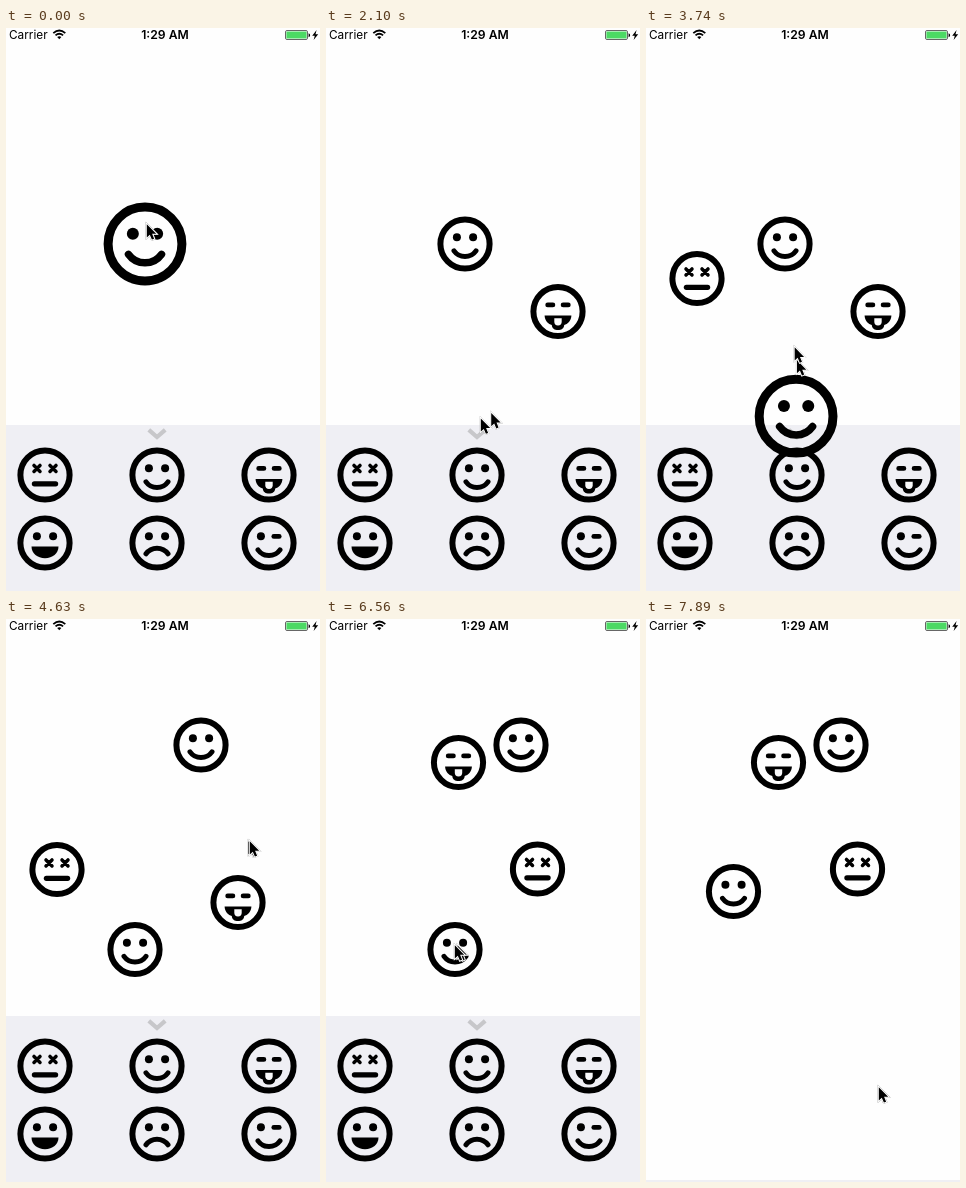
Write an HTML page that moves like this. It is 314 by 563 pixels and loops after 8 s.

```html
<!DOCTYPE html>
<html lang="en">
<head>
<meta charset="utf-8">
<title>Emoji tray</title>
<style>
  html, body { margin: 0; height: 100%; overflow: hidden; background: #fefefe; }
  svg { display: block; width: 100vw; height: 100vh; }
  text { font: 11.8px Inter, "Liberation Sans", sans-serif; }
  .line { fill: none; stroke: #000; stroke-linecap: round; stroke-linejoin: round; }
  #pointer { filter: drop-shadow(0 .6px .7px rgba(0, 0, 0, .5)); }
</style>
</head>
<body>
<svg viewBox="0 0 314 563">
  <defs>
    <circle id="ring" r="24.6" class="line" stroke-width="6"/>
    <g id="eyes"><circle cx="-8.1" cy="-6.8" r="4"/><circle cx="8.1" cy="-6.8" r="4"/></g>
    <path id="grin" class="line" stroke-width="5" d="M-11 6.9A13.5 13.5 0 0 0 11 6.9"/>

    <g id="smile"><use href="#ring"/><use href="#eyes"/><use href="#grin"/></g>
    <g id="dead">
      <use href="#ring"/>
      <path class="line" stroke-width="3.5" d="M-11-9.6l6 6m0-6l-6 6M5-9.6l6 6m0-6l-6 6"/>
      <path class="line" stroke-width="5.2" d="M-10.6 8.8H10.6"/>
    </g>
    <g id="tongue">
      <use href="#ring"/>
      <path class="line" stroke-width="4.8" d="M-10.3-6.6h5.2M5.1-6.6h5.2"/>
      <path d="M-13.4 4H13.4C13.4 9 9.5 13 6.2 13.4C6 16.8 3.4 18.6 0 18.6S-6 16.8-6.2 13.4C-9.5 13-13.4 9-13.4 4Z"/>
      <path fill="#fafafb" d="M-3.7 6.8H3.7V10.2A3.7 3.7 0 0 1-3.7 10.2Z"/>
    </g>
    <g id="laugh">
      <use href="#ring"/><use href="#eyes"/>
      <path d="M-13.5 3.5H13.5C13.5 10.5 7.5 15.2 0 15.2S-13.5 10.5-13.5 3.5Z"/>
    </g>
    <g id="sad">
      <use href="#ring"/><use href="#eyes"/>
      <path class="line" stroke-width="5" d="M-11 10.8A13.5 13.5 0 0 1 11 10.8"/>
    </g>
    <g id="wink">
      <use href="#ring"/><use href="#grin"/>
      <circle cx="-8.1" cy="-6.8" r="4"/>
      <path class="line" stroke-width="4.8" d="M4.8-6.6h5.4"/>
    </g>
    <path id="pointer" stroke="#fff" stroke-width="2" paint-order="stroke"
      d="M.8 1.2V14.4L3.8 11.7L5.9 16.6L8.1 15.7L6.1 10.8H10.2Z"/>
  </defs>

  <text x="3" y="11.1">Carrier</text>
  <path d="M47.3 5.2Q53.3-.2 59.3 5.2M49.5 7.4Q53.3 4.1 57.1 7.4" fill="none" stroke="#000" stroke-width="1.8"/>
  <path d="M51.2 9Q53.3 7.3 55.4 9L53.3 11.3Z"/>
  <text x="159" y="11.1" text-anchor="middle" font-weight="600" style="font-size:12.2px;font-weight:600">1:29 AM</text>
  <rect x="279.5" y="2.5" width="22" height="9" rx="1.5" fill="#fff" stroke="#555" stroke-width=".9"/>
  <rect x="280.4" y="3.4" width="20.2" height="7.2" rx=".6" fill="#4cd964"/>
  <path d="M302.6 5.3q1.5.3 1.5 2t-1.5 2zM310.6 2L306.2 7.8H308.8L307.6 12L312.2 6.2H309.5Z"/>

  <g id="panel">
    <rect y="397" width="314" height="166" fill="#efeff4"/>
    <path d="M142.8 401.8L151 409L159.2 401.8" fill="none" stroke="#c7c7ca" stroke-width="4.2"/>
  </g>
  <g id="faces"></g>
  <use id="trail" href="#pointer"/>
  <use id="cursor" href="#pointer"/>
</svg>
<script>
const LOOP = 8000, LAST_TICK = 48, TRAIL_LAG = 0.15;
const byId = id => document.getElementById(id);

function addFace(parent, shape) {
  const node = document.createElementNS("http://www.w3.org/2000/svg", "use");
  node.setAttribute("href", "#" + shape);
  byId(parent).append(node);
  return node;
}

function place(node, [x, y], scale = 1) {
  node.setAttribute("transform", `translate(${x} ${y}) scale(${scale})`);
}

["dead", "smile", "tongue", "laugh", "sad", "wink"].forEach((shape, i) =>
  place(addFace("panel", shape), [39 + 112 * (i % 3), 447 + 68 * Math.floor(i / 3)]));

const faces = ["smile", "tongue", "dead", "smile"].map(shape => ({ node: addFace("faces", shape), drags: [] }));
const [firstSmile, tongue, dead, secondSmile] = faces;

// New faces are lifted from the tray; later drags start where the face lies.
// Gestures without a face only move the pointer.
const gestures = [
  { face: firstSmile, grab: -1, drop: -1, from: [139, 216], to: [139, 216], lifted: true, grip: [1, -21] },
  { face: tongue, grab: 4.1, drop: 6, from: [266, 447], to: [232, 283.5], lifted: true },
  { face: dead, grab: 11, drop: 13, from: [41.5, 447.5], to: [52, 259], lifted: true },
  { face: dead, grab: 13.5, drop: 14, to: [51, 250.5], grip: [2, -30] },
  { face: secondSmile, grab: 18, drop: 20, from: [151.5, 433], to: [129, 330.5], lifted: true },
  { face: firstSmile, grab: 22, drop: 24, to: [195, 126] },
  { grab: 26, drop: 26, from: [244, 226], to: [244, 226] },
  { face: tongue, grab: 28, drop: 31, to: [132.5, 143.5] },
  { face: dead, grab: 33, drop: 37, to: [211.5, 250] },
  { grab: 39, drop: 39, from: [129, 330], to: [129, 330] },
  { face: secondSmile, grab: 41, drop: 43, to: [87.5, 272.5] },
  { grab: 45, drop: 47, from: [200, 410], to: [233, 472] }
];

const add = (a, b) => [a[0] + b[0], a[1] + b[1]];
const pointerStops = [];
for (const gesture of gestures) {
  const { face, lifted } = gesture;
  gesture.from ??= face.drags.at(-1).to;
  gesture.grip ??= lifted ? [2, -38] : [-1, -5];
  face?.drags.push(gesture);
  pointerStops.push(
    { tick: gesture.grab, at: add(gesture.from, gesture.grip) },
    { tick: gesture.drop, at: add(gesture.to, gesture.grip) });
}

function progress(start, end, tick) {
  if (tick >= end) return 1;
  const p = Math.max(0, (tick - start) / (end - start));
  return p * p * (3 - 2 * p);
}

// Hand-like curve: vertical movement first, then sideways.
const swing = (a, b, p) => [a[0] + (b[0] - a[0]) * p * p, a[1] + (b[1] - a[1]) * p * (2 - p)];

function pointerAt(tick) {
  const i = pointerStops.findLastIndex(stop => stop.tick <= tick);
  const a = pointerStops[Math.max(0, i)], b = pointerStops[i + 1] ?? a;
  return swing(a.at, b.at, progress(a.tick, b.tick, i < 0 ? a.tick - 1 : tick));
}

function drawFace({ node, drags }, tick) {
  const drag = drags.findLast(d => d.grab <= tick);
  node.style.display = drag ? "" : "none";
  if (!drag) return;
  const p = progress(drag.grab, drag.drop, tick);
  // A lifted face trails behind the pointer.
  const position = swing(drag.from, drag.to, drag.lifted ? p * p : p);
  place(node, position, drag.lifted && tick <= drag.drop ? 1.5 : 1);
}

// The screen refreshes in slightly uneven steps of about 150 ms.
const tickStart = tick => 750 + 150 * tick - 10 * Math.max(0, Math.floor((tick - 15) / 5.5));

function tickAt(time) {
  let tick = -1;
  while (tick < LAST_TICK && tickStart(tick + 1) <= time) tick++;
  return tick;
}

function draw(now) {
  const tick = tickAt(now % LOOP);
  faces.forEach(face => drawFace(face, tick));
  place(byId("panel"), [0, 164 * progress(45, LAST_TICK, tick)]);
  place(byId("trail"), pointerAt(tick - TRAIL_LAG));
  place(byId("cursor"), pointerAt(tick));
}

const began = performance.now();
function loop() {
  draw(performance.now() - began);
  requestAnimationFrame(loop);
}
loop();
</script>
</body>
</html>
```
